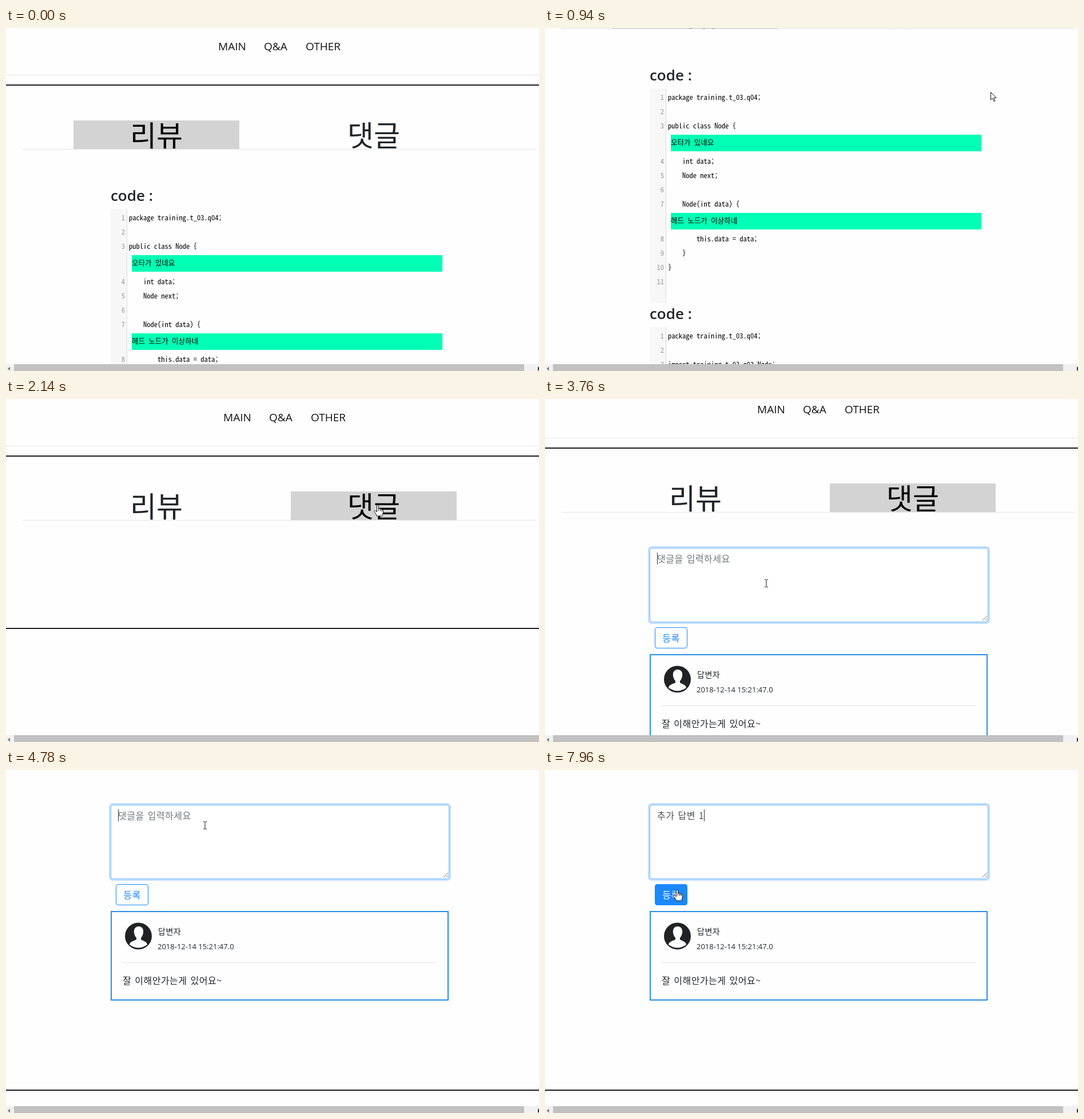
An HTML page for the animation above (8000 ms loop, 932 px wide and 601 px high).

```html
<!DOCTYPE html>
<html lang="ko">
<head>
<meta charset="utf-8">
<title>Code review page</title>
<style>
  html, body { margin: 0; width: 100%; height: 100%; overflow: hidden; background: #fefefe; }
  body { position: relative; color: #212529; font: 16px/20px "Open Sans", "Noto Sans CJK KR", "Noto Sans CJK", sans-serif; }
  body *, body *::before { position: absolute; box-sizing: border-box; white-space: pre; }
  #view { left: 0; top: 0; width: 932px; height: 589px; overflow: hidden; }
  #page { left: 0; top: 0; width: 932px; height: 1200px; }
  #codes, #comments { left: 0; top: 0; width: 932px; }
  .rule { height: 1px; background: #e5e5e6; }
  .bar { left: 0; width: 932px; height: 2px; background: #1c1c1e; }
  #nav { left: 0; top: 22px; font-size: 19px; color: #111; }
  .tab { top: 162px; width: 290px; height: 50px; text-align: center; line-height: 47px; }
  .tab.on { background: #d3d3d3; color: #000; }
  .tab, .ko { font-family: "Noto Sans CJK KR", "Noto Sans CJK", sans-serif; }
  .tab { font-size: 50px; }
  .ko { letter-spacing: .5px; word-spacing: 1px; }
  h3 { left: 183px; margin: 0; font: 600 26px/32px "Open Sans", "Noto Sans", sans-serif; }
  .gutter { left: 183px; width: 29px; background: #f7f7f7; border-right: 1px solid #ddd; }
  .code, .num, .note { font: 12.53px/20px "Noto Sans Mono CJK KR", "Noto Sans Mono", monospace; color: #000; }
  .code { left: 215px; }
  .num { left: 183px; width: 25px; text-align: right; color: #999; }
  .note { left: 220px; width: 543px; height: 29px; line-height: 25px; background: #00ffb4; }
  #box { left: 183px; top: 275px; width: 592px; height: 130px; border: 1px solid #ced4da; border-radius: 4px; background: #fff; }
  #box.warm { border-color: #b0d0f0; }
  #box.on { border-color: #80bdff; box-shadow: 0 0 0 3px rgba(0, 123, 255, .25); }
  #line { left: 12px; top: 7px; color: #495057; }
  #line.empty { color: #6c757d; }
  #line span { position: static; }
  #caret { top: 7px; width: 1px; height: 21px; background: #333; }
  #send { left: 192px; top: 414px; width: 57px; height: 37px; border: 1px solid #1a88ff; border-radius: 4px; color: #1a88ff; text-align: center; line-height: 34px; }
  #send.on { background: #1a88ff; color: #fff; }
  #card { left: 183px; top: 461px; width: 591px; height: 157px; border: 2px solid #2a8fe8; }
  #scroll { left: 0; top: 589px; width: 932px; height: 12px; background: #f1f1f1; }
  #thumb { left: 14px; top: 0; height: 12px; background: #c1c1c1; }
  svg { overflow: visible; }
  #cursor { left: 0; top: 0; width: 1px; height: 1px; }
</style>
</head>
<body>
<div id="view">
  <div id="page">
    <div id="nav"><span style="left:371px">MAIN</span><span style="left:451px">Q&amp;A</span><span style="left:524px">OTHER</span></div>
    <div class="rule" style="left:0;top:82px;width:932px"></div>
    <div class="bar" style="top:99px"></div>
    <div class="tab" id="review" style="left:118px">리뷰</div>
    <div class="tab" id="reply" style="left:498px">댓글</div>
    <div class="rule" style="left:28px;top:212px;width:900px"></div>
    <div id="codes"></div>
    <div id="comments">
      <div id="box">
        <div id="line" class="ko"><span id="typed"></span></div>
        <div id="caret"></div>
        <svg style="left:581px;top:118px" width="9" height="9"><path d="M0 8L8 0M5 8L8 5" stroke="#777"/></svg>
      </div>
      <div id="send" class="ko">등록</div>
      <div id="card">
        <svg style="left:23px;top:18px" width="47" height="47">
          <circle cx="23.5" cy="24" r="23.5" fill="#212226"/>
          <path d="M24 7C18 7 15 12 16 18C16.500 22 18 25 20 27V30C15 33 9 33 8 39Q23.500 50 39 39C38 33 32 33 28 30V27C30 25 31.500 22 32 18C33 12 30 7 24 7Z" fill="#fff"/>
        </svg>
        <div class="ko" style="left:81px;top:23px;font-size:14px">답변자</div>
        <div style="left:80px;top:50px;font-size:13px">2018-12-14 15:21:47.0</div>
        <div class="rule" style="left:18px;top:88px;width:551px"></div>
        <div class="ko" style="left:19px;top:109px">잘 이해안가는게 있어요~</div>
      </div>
    </div>
    <div class="bar" id="foot"></div>
  </div>
</div>
<div id="scroll">
  <div id="thumb"></div>
  <svg style="left:0;top:0" width="932" height="12"><path d="M3 8L7 4.500V11.500Z" fill="#777"/><path id="next" d="M930 4V12L934 8Z" fill="#333"/></svg>
</div>
<svg id="cursor" fill="#fff" stroke="#111" stroke-linejoin="round">
  <path id="arrow" d="M.5 .5V14L3.500 11L6 16.500L8 15.500L5.800 10.300H10Z"/>
  <path id="hand" d="M-1.500 1.500Q0 -.5 1.500 1.500V8L2 6.500Q4 6 4.500 8Q6.500 6.500 7.200 9Q9.500 8 9.500 10.500V14Q9 17 7.500 20H-1.500Q-3 16 -6 12.500Q-6 9.500 -3.500 11L-1.500 13ZM1.500 8V11M4.500 8V11.500M7.200 9V12"/>
  <path id="beam" fill="none" d="M-3 -6.500H-1L0 -5.500L1 -6.500H3M0 -5.500V5.500M-3 6.500H-1L0 5.500L1 6.500H3"/>
</svg>
<script>
const LOOP = 8000, STEP = 60, OFFSET = 40;
const $ = id => document.getElementById(id);

function add(cls, top, text, tag = "div") {
  const el = document.createElement(tag);
  el.className = cls;
  el.style.top = top + "px";
  el.textContent = text;
  $("codes").append(el);
  return el;
}

// A line starting with "#" is a review note.
function listing(top, height, source) {
  add("", top, "code :", "h3");
  add("gutter", top + 40, "").style.height = height + "px";
  let y = top + 55, n = 0;
  for (const line of source.split("\n")) {
    if (line[0] === "#") {
      add("note", y - 9, line.slice(1));
      y += 36.5;
    } else {
      add("num", y - 10, ++n);
      add("code", y - 10, line);
      y += 25;
    }
  }
}

listing(277, 376, `package training.t_03.q04;

public class Node {
#오타가 있네요
    int data;
    Node next;

    Node(int data) {
#헤드 노드가 이상하네
        this.data = data;
    }
}
`);
listing(695, 400, `package training.t_03.q04;

import training.t_03.q02.Node;

public class Main {
    public static void main(String[] args) {
        Node head = new Node(1);
    }
}`);

const scrollPath = [[700, 0], [760, 26], [820, 96], [880, 147], [940, 211], [1000, 260], [1060, 290], [1120, 300],
  [1360, 300], [1420, 211], [1540, 96], [1660, 26], [1720, 0], [3580, 0], [3760, 14], [3880, 14],
  [4000, 64], [4120, 114], [4300, 150], [4420, 200], [4540, 214]];
const cursorPath = [[220, 882, 68], [460, 815, 102], [640, 781, 112], [1360, 777, 112], [1720, 777, 112],
  [1960, 694, 150], [2080, 650, 185], [2740, 650, 185], [2800, 640, 210], [3040, 640, 210],
  [3400, 387, 323], [3880, 387, 323], [4300, 365, 190], [4660, 348, 97], [4780, 348, 97], [4900, 345, 102],
  [7120, 345, 102], [7180, 304, 142], [7480, 304, 142], [7900, 231, 209]];
const cursorKind = [[0, ""], [100, "arrow"], [2020, "hand"], [2740, "arrow"], [3220, "beam"], [7780, "hand"]];
const typing = [[0, ""], [4900, "ㅊ"], [5080, ""], [5380, "ㅊ"], [5920, "추"], [6040, "추ㄱ"], [6100, "추가"],
  [6160, "추가 "], [6460, "추가 ㄷ"], [6520, "추가 다"], [6580, "추가 답"], [6640, "추가 답ㅂ"],
  [6820, "추가 답벼"], [6880, "추가 답변"], [7000, "추가 답변 "], [7180, "추가 답변 1"]];

const hold = (list, t) => list.filter(k => k[0] <= t).pop()[1];

function glide(path, t, i = 1) {
  const next = path.findIndex(p => p[0] > t);
  if (next < 0) return path[path.length - 1][i];
  if (next === 0) return path[0][i];
  const a = path[next - 1], b = path[next];
  return a[i] + (b[i] - a[i]) * (t - a[0]) / (b[0] - a[0]);
}

const show = (id, on) => { $(id).style.display = on ? "" : "none"; };

function draw(t) {
  const comments = t >= 2140, loaded = t >= 2740, narrow = comments && !loaded;
  $("page").style.transform = `translateY(${-Math.round(glide(scrollPath, t))}px)`;
  $("nav").style.left = narrow ? "9px" : "0";
  $("review").classList.toggle("on", !comments);
  $("reply").classList.toggle("on", comments);
  show("codes", !comments);
  show("comments", loaded);
  show("foot", comments);
  $("foot").style.top = (loaded ? 774 : 401) + "px";
  $("thumb").style.width = (narrow ? 918 : 892) + "px";
  show("next", !narrow);

  $("box").className = t >= 3640 ? "on" : t >= 3460 ? "warm" : "";
  const text = hold(typing, t);
  $("typed").textContent = text || "댓글을 입력하세요";
  $("line").classList.toggle("empty", !text);
  show("caret", t >= 3640);
  $("caret").style.left = 12 + (text ? $("typed").offsetWidth : 0) + "px";
  $("send").className = t >= 7840 ? "ko on" : "ko";

  const kind = hold(cursorKind, t);
  for (const id of ["arrow", "hand", "beam"]) show(id, id === kind);
  $("cursor").style.transform = `translate(${Math.round(glide(cursorPath, t))}px, ${Math.round(glide(cursorPath, t, 2))}px)`;
}

const start = performance.now();
function tick() {
  const t = (performance.now() - start) % LOOP;
  draw(Math.max(0, Math.floor((t - OFFSET) / STEP) * STEP + OFFSET));
  requestAnimationFrame(tick);
}
tick();
</script>
</body>
</html>
```
